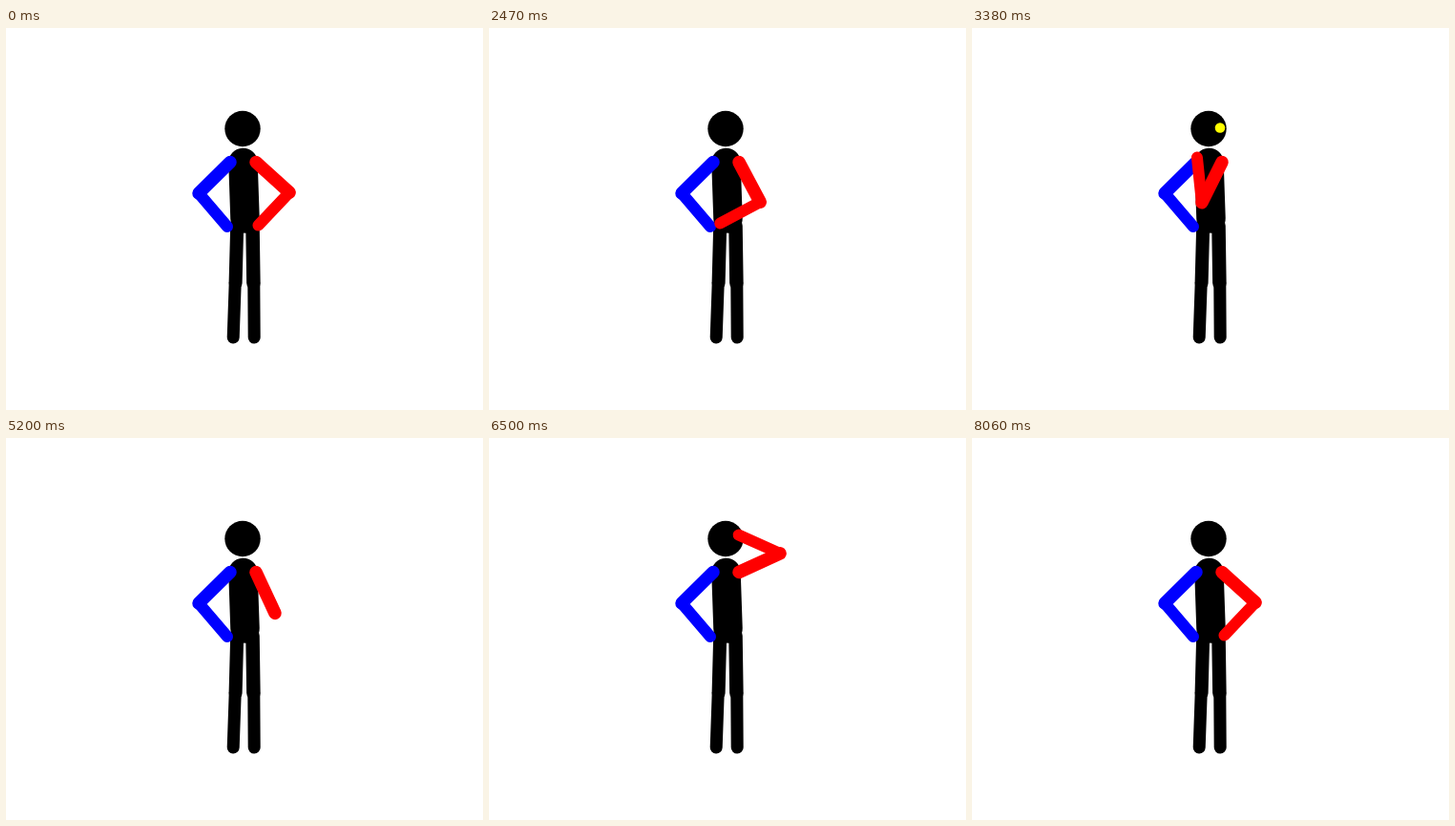
Write an HTML page with a canvas that moves like this. It is 500x400 px and loops after 8.19 s.

```html
<!DOCTYPE html>
<html lang="en">
<head>
<meta charset="utf-8">
<title>Stick figure tapping</title>
<style>
html, body { margin: 0; width: 100%; height: 100%; overflow: hidden; background: #fff; }
canvas { display: block; }
</style>
</head>
<body>
<canvas id="stage" width="500" height="400"></canvas>
<script>
const ctx = document.getElementById('stage').getContext('2d');
const STEP = 130, LOOP = 8190;
const UPPER = 47.3, FORE = 47.5;
const SHOULDER = [262, 140.5];

// Each pose: upper arm angle, forearm angle (degrees, y down).
const HIP = [42, 133.5], CHEST = [116.5, 264], SALUTE = [-24.5, 204];

// Each move: start time and one pose per step; the last pose is held.
const moves = [
  [0, [HIP]],
  [2470, [[62, 152], [87, 174], [111, 197], [115, 219], [116, 242], CHEST]],
  [5200, [[65, 245], [35, 231], [5, 218], SALUTE]],
  [7670, [[-5, 189], [16, 174], [33, 153], HIP]]
];

// Each tap: start, end, x, y.
const taps = [
  [390, 1040, 234, 140.5], [1430, 2080, 234, 140.5],
  [3380, 4030, 260, 104.5], [4290, 4940, 260, 104.5],
  [5850, 6500, 266, 212.5], [6760, 7410, 266, 212.5]
];

function bone(a, b, width, color) {
  ctx.strokeStyle = color;
  ctx.lineWidth = width;
  ctx.beginPath();
  ctx.moveTo(...a);
  ctx.lineTo(...b);
  ctx.stroke();
}

function disc(x, y, r, color) {
  ctx.fillStyle = color;
  ctx.beginPath();
  ctx.arc(x, y, r, 0, 2 * Math.PI);
  ctx.fill();
}

function reach([x, y], length, degrees) {
  const a = degrees * Math.PI / 180;
  return [x + length * Math.cos(a), y + length * Math.sin(a)];
}

function arm(shoulder, elbow, hand, color) {
  bone(shoulder, elbow, 13.5, color);
  bone(elbow, hand, 12, color);
}

function poseAt(t) {
  const [start, steps] = moves.filter(m => t >= m[0]).pop();
  return steps[Math.min(steps.length - 1, Math.floor((t - start) / STEP))];
}

function body() {
  disc(248, 105.5, 18.7, '#000');
  bone([248.5, 141], [250.5, 199.5], 30.5, '#000');
  bone([242.2, 207], [240.6, 267], 14, '#000');
  bone([240.2, 267], [238.2, 324], 13, '#000');
  bone([258.5, 207], [259.4, 267], 14.5, '#000');
  bone([259.8, 267], [260.2, 324], 13, '#000');
}

function draw(t) {
  ctx.fillStyle = '#fff';
  ctx.fillRect(0, 0, 500, 400);
  ctx.lineCap = 'round';
  body();
  arm([235, 140.5], [202, 173], [232, 208], '#00f');
  const [upper, fore] = poseAt(t);
  const elbow = reach(SHOULDER, UPPER, upper);
  arm(SHOULDER, elbow, reach(elbow, FORE, fore), '#f00');
  for (const [from, to, x, y] of taps) {
    if (t >= from && t < to) disc(x, y, 5.3, '#ff0');
  }
}

const began = performance.now();
function tick() {
  draw((performance.now() - began) % LOOP);
  requestAnimationFrame(tick);
}
tick();
</script>
</body>
</html>
```
